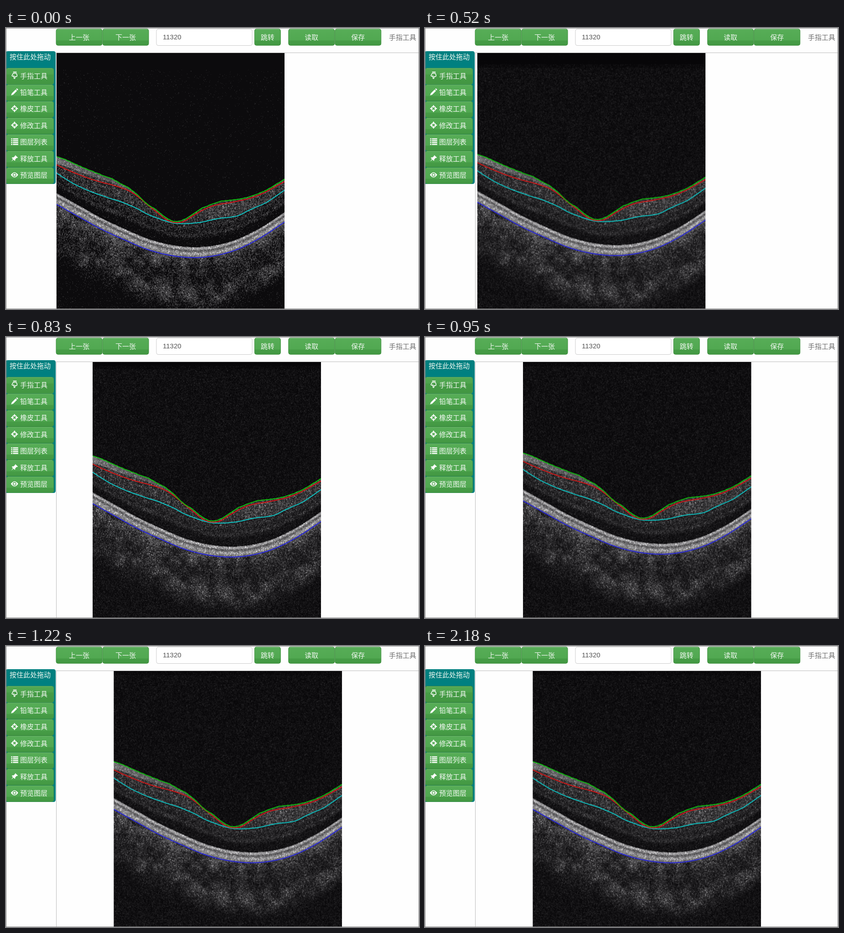
Write an HTML page with a canvas that moves like this. It is 906 px wide and 618 px high and loops after 2280 ms.

```html
<!DOCTYPE html>
<html lang="zh-CN">
<head>
<meta charset="utf-8">
<title>图层标注</title>
<style>
html, body { margin: 0; width: 100%; height: 100%; overflow: hidden; background: #fefefe; }
#view { position: absolute; left: 110px; top: 54px; width: 795px; height: 563px; overflow: hidden;
  border: solid #bcbcbc; border-width: 1px 0 0 1px; box-sizing: border-box; }
#view canvas { position: absolute; left: 0; top: 0; }
#ui { position: absolute; left: 0; top: 0; }
text { font: 300 15px "Noto Sans CJK SC", "Noto Sans CJK", sans-serif; }
.num { font: 15px "Liberation Sans", Arial, sans-serif; }
</style>
</head>
<body>
<div id="view"></div>
<svg id="ui" width="906" height="618" viewBox="0 0 906 618">
  <defs>
    <linearGradient id="face" x2="0" y2="1">
      <stop offset="0" stop-color="#57ad57"/><stop offset=".68" stop-color="#51a851"/>
      <stop offset=".72" stop-color="#469c46"/><stop offset="1" stop-color="#439843"/>
    </linearGradient>
    <linearGradient id="focus" x2="0" y2="1">
      <stop offset="0" stop-color="#51a851"/><stop offset=".36" stop-color="#4fa54f"/>
      <stop offset=".42" stop-color="#469c46"/><stop offset="1" stop-color="#429642"/>
    </linearGradient>
  </defs>
</svg>
<script>
const LOOP = 2280, W = 501, H = 600;
const NS = 'http://www.w3.org/2000/svg';
const ui = document.getElementById('ui'), view = document.getElementById('view');

// ---- scan picture ----
// Layer depths sampled at even steps across the scan
const layers = {
  green: [228, 235, 244, 253, 261, 269, 276, 287, 298, 314, 333, 346, 362, 371, 367, 355, 342, 334,
    327, 324.5, 322, 318, 311, 303, 291, 279],
  red: [246, 255.5, 264, 272, 279, 285, 290, 296, 304, 317, 334, 350, 366, 373.5, 371, 358.5, 347, 338,
    333, 330, 326, 321.5, 315, 306, 295, 284],
  cyan: [264, 277, 289, 298.5, 307, 314, 321, 327, 335, 344, 355, 363, 370, 375, 376, 375, 372.5, 368,
    364, 362, 358, 348, 339, 330, 317, 303],
  blue: [333, 361, 388.5, 411.5, 432.5, 445.5, 450.5, 446, 431.5, 406, 373]
};

function depth(name, x) {
  const p = layers[name], n = p.length - 1;
  const u = x / 500 * n, i = Math.max(0, Math.min(n - 1, Math.floor(u))), t = u - i;
  const b = p[i], c = p[i + 1], a = i ? p[i - 1] : 2 * b - c, d = i < n - 1 ? p[i + 2] : 2 * c - b;
  return b + t / 2 * (c - a + t * (2 * a - 5 * b + 4 * c - d + t * (3 * (b - c) + d - a)));
}

function random(seed) {
  return () => {
    seed = seed + 0x6D2B79F5 | 0;
    let t = Math.imul(seed ^ seed >>> 15, 1 | seed);
    t = t + Math.imul(t ^ t >>> 7, 61 | t) ^ t;
    return ((t ^ t >>> 14) >>> 0) / 4294967296;
  };
}

const bell = (v, mid, width) => Math.exp(-(((v - mid) / width) ** 2));
const clamp = (v, lo, hi) => Math.max(lo, Math.min(hi, v));

// Smooth value noise for the mottled tissue
const rnd = random(11320);
const grid = Array.from({ length: 1600 }, rnd);
function mottle(x, y, size) {
  const u = x / size, v = y / size, i = Math.floor(u), j = Math.floor(v);
  const ease = t => t * t * (3 - 2 * t), fx = ease(u - i), fy = ease(v - j);
  const at = (a, b) => grid[(b % 40) * 40 + a % 40];
  const top = at(i, j) * (1 - fx) + at(i + 1, j) * fx;
  const low = at(i, j + 1) * (1 - fx) + at(i + 1, j + 1) * fx;
  return top * (1 - fy) + low * fy;
}

// Mean brightness of one pixel
function level(x, y, d) {
  if (y < d.green) return y < 30 ? 5 : y < 38 ? 11 : 16;
  if (y < d.red) {
    const nerve = 16 - x * .06;
    return y - d.green < nerve ? 112 - x * .16 : 62;
  }
  if (y < d.cyan) return 52 + 14 * bell(x, 370, 50);
  if (y < d.rim - 2) {
    const k = (y - d.cyan) / (d.rim - d.cyan);
    return 20 + 24 * bell(k, .12, .22) + 22 * bell(k, .48, .12);
  }
  if (y < d.blue + 1) {
    const k = (y - d.rim) / (d.blue - d.rim);
    return 105 + 62 * bell(k, .08, .13) - 18 * bell(k, .33, .1) + 48 * bell(k, .65, .22);
  }
  const below = y - d.blue;
  const m = clamp((mottle(x, y, 20) * .65 + mottle(x + 90, y + 50, 9) * .35 - .5) * 1.7 + .5, 0, 1);
  const tissue = 58 * bell(below, 0, 22) + (38 - x * .05) * bell(below, 36, 24) + 42 * bell(below, 82, 27);
  return 18 + tissue * (.3 + .85 * m);
}

const grain = new Float32Array((W + 2) * (H + 2)).map(() => -Math.log(1 - rnd()));
function speckle(x, y) {
  const w = W + 2, i = (y + 1) * w + x + 1;
  const s = .38 * grain[i] + .2 * (grain[i - w] + grain[i + w]) + .11 * (grain[i - 1] + grain[i + 1]);
  return Math.min(s, 2.7);
}

function drawScan(floor, base) {
  const cv = document.createElement('canvas');
  cv.width = W;
  cv.height = H;
  const g = cv.getContext('2d'), img = g.createImageData(W, H);
  for (let x = 0; x < W; x++) {
    const d = {};
    for (const name in layers) d[name] = depth(name, x);
    d.rim = d.blue - 23 + x * .006;
    for (let y = 0; y < H; y++) {
      const mean = level(x, y, d);
      const contrast = mean > 75 ? .38 : .8;
      let v = mean * (1 + contrast * (speckle(x, y) - 1));
      if (v < floor) v = base;
      v = clamp(v, base, 225);
      img.data.set([v, v - 1, v + 1, 255], (y * W + x) * 4);
    }
  }
  g.putImageData(img, 0, 0);
  g.lineWidth = 2;
  g.lineJoin = 'round';
  const inks = { cyan: '#0fc3c3', blue: '#2424dc', red: '#d31515', green: '#0cc00c' };
  for (const name in inks) {
    g.strokeStyle = inks[name];
    g.beginPath();
    for (let x = 0; x <= W; x += 3) {
      const y = depth(name, x);
      g.lineTo(x, (name === 'green' ? Math.round(y) : y) + .4);
    }
    g.stroke();
  }
  view.append(cv);
  return cv;
}

const still = drawScan(31, 12), moving = drawScan(0, 7);

// ---- interface ----
function add(tag, attrs, parent = ui) {
  const el = document.createElementNS(NS, tag);
  for (const k in attrs) el.setAttribute(k, attrs[k]);
  parent.append(el);
  return el;
}

function label(x, y, str, fill = '#f0f7f0', attrs = {}) {
  add('text', { x, y, fill, ...attrs }).textContent = str;
}

function button(x, y, w, h, fill = 'url(#face)') {
  const el = add('rect', { x: x + .5, y: y + .5, width: w - 1, height: h - 1, rx: 4, fill, stroke: '#3e8f3e' });
  add('path', { d: `M${x + 4} ${y + 1.5}h${w - 8}`, stroke: '#fff', 'stroke-opacity': .15 });
  return el;
}

const topButtons = [[109.5, 102, '上一张'], [211.5, 102, '下一张'], [544.8, 58, '跳转'], [619.3, 102, '读取'], [721.3, 102, '保存']];
for (const [x, w, str] of topButtons) {
  button(x, 1.7, w, 37);
  label(x + w / 2, 25.5, str, undefined, { 'text-anchor': 'middle' });
}
add('rect', { x: 330, y: 2.5, width: 210, height: 36, rx: 4, fill: '#fff', stroke: '#ccc' });
label(344, 25, '11320', '#555', { class: 'num' });
label(840, 25.5, '手指工具', '#707070');

add('path', { d: 'M0 54Q0 51 4 51H104Q109 51 109 56V338Q109 343 104 343H0Z', fill: '#008080' });
label(8, 69, '按住此处拖动');

// Icons are drawn around their own centre
const target = '<circle r="4.6" fill="none" stroke="#fff" stroke-width="2"/>' +
  '<path d="M0-7.5V-2M0 7.5V2M-7.5 0H-2M7.5 0H2" stroke="#fff" stroke-width="2.2"/>';
const icons = {
  hand: '<path d="M-3-7.3H4.5" stroke="#fff" stroke-width="2"/><path d="M-3-4.5H4L5.5-1V1.5Q5 3 3 2.5L1 2.5V6Q0 8-1.3 6V1L-4 2Q-6 1.5-5.5 0Z" fill="none" stroke="#fff" stroke-width="1.5" stroke-linejoin="round"/>',
  pencil: '<path d="M-7.5 7.5L-6 3L2.5-5.5L5.5-2.5L-3 6ZM3.5-6.5L5-7.7Q6-8 7.5-6Q8-5 7.5-4.5L6.5-3.5Z" fill="#fff"/>',
  target,
  list: [-6, -2, 2, 6].map(y => `<path d="M-7.5 ${y}h2.7M-3.5 ${y}h11.5" stroke="#fff" stroke-width="2.5"/>`).join(''),
  pin: '<path d="M1.5-7L7.5-1.5L6-.5L4.5-.7L1.5 2.5L1.5 5L.3 5.5L-2.3 3L-7 7L-3.5 1.7L-6-.8L-5-2L-2.2-2L1-5Z" fill="#fff"/>',
  eye: '<path d="M-8 0Q0-11 8 0Q0 11-8 0Z" fill="#fff"/><circle r="3.9" fill="#4ca34c"/><circle r="2.5" fill="#fff"/>'
};
const tools = [['hand', '手指工具'], ['pencil', '铅笔工具'], ['target', '橡皮工具'], ['target', '修改工具'],
  ['list', '图层列表'], ['pin', '释放工具'], ['eye', '预览图层']];
let firstTool;
tools.forEach(([icon, str], i) => {
  const y = 87.8 + i * 36.43;
  const el = button(0, y, 105, 36.4, i ? undefined : 'url(#focus)');
  if (!i) firstTool = el;
  add('g', { transform: `translate(18.7 ${y + 16.5})` }).innerHTML = icons[icon];
  label(31, y + 22.7, str);
});
add('rect', { x: .5, y: .5, width: 905, height: 617, fill: 'none', stroke: '#8c8c8c' });

// ---- motion: the drag arrives as hard steps [time, x, y] ----
const drag = [[0, 110, 0], [520, 114.5, -4.5], [700, 162.7, -14.5], [830, 190, -21], [950, 214.8, -27.3],
  [1070, 231.5, -28], [1220, 236.2, -28.2]];

function render(t) {
  const [start, x, y] = drag.filter(s => s[0] <= t).pop();
  still.style.display = start ? 'none' : '';
  moving.style.display = start ? '' : 'none';
  for (const cv of [still, moving]) cv.style.transform = `translate(${x - 111}px, ${y - 1}px)`;
  firstTool.setAttribute('stroke', t >= 2180 ? '#398439' : '#4a9a4a');
}

const begin = performance.now();
function tick() {
  render((performance.now() - begin) % LOOP);
  requestAnimationFrame(tick);
}
tick();
</script>
</body>
</html>
```
